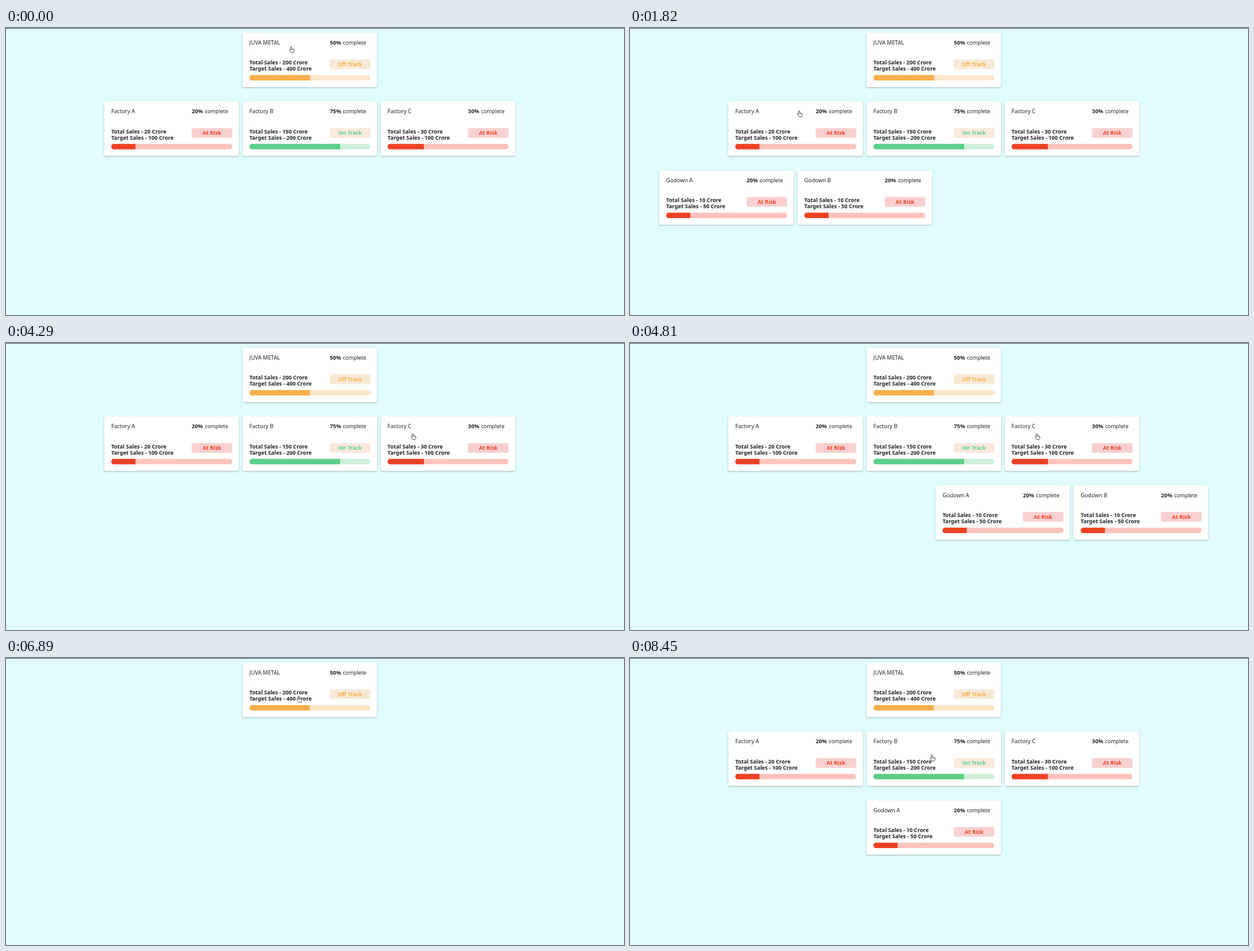
Write an HTML page with a canvas that moves like this. It is 999 px wide and 465 px high and loops after 8970 ms.

```html
<!DOCTYPE html>
<html lang="en">
<head>
<meta charset="utf-8">
<title>Sales overview</title>
<style>
  html, body { margin: 0; width: 100%; height: 100%; overflow: hidden; background: #e0fcfd; }
  canvas { display: block; }
</style>
</head>
<body>
<canvas id="stage" width="999" height="465"></canvas>
<script>
const ctx = document.getElementById('stage').getContext('2d');
const LOOP = 8970, TICK = 130;
const FONT = '"Noto Sans", "Open Sans", sans-serif';
const INK = '#212529';

const STATUS = {
  off:  { label: 'Off Track', main: '#f9b04b', track: '#fde5c9', badge: '#f8e9d6' },
  on:   { label: 'On Track',  main: '#5bce86', track: '#cdefd9', badge: '#fbe9dc' },
  risk: { label: 'At Risk',   main: '#ee4124', track: '#fbc3bc', badge: '#f9d0d0' }
};

const COLUMN = 223.35, ROW = 111.5;
const card = (name, col, row, sales, goal, status) => ({
  name, sales, goal, status: STATUS[status],
  x: 382.2 + col * COLUMN, y: 7.5 + row * ROW
});
const godown = (letter, col) => card('Godown ' + letter, col, 2, 10, 50, 'risk');

const company = card('JUVA METAL', 0, 0, 200, 400, 'off');
const factories = [
  card('Factory A', -1, 1, 20, 100, 'risk'),
  card('Factory B', 0, 1, 150, 200, 'on'),
  card('Factory C', 1, 1, 30, 100, 'risk')
];

// Cards visible only between two times
const opened = [
  { from: 1820, to: 3510, cards: [godown('A', -1.5), godown('B', -0.5)] },
  { from: 4810, to: 5720, cards: [godown('A', 0.5), godown('B', 1.5)] },
  { from: 8450, to: LOOP, cards: [godown('A', 0)] }
];

// Pointer moves: start time, number of ticks, destination
const START = [462, 35];
const moves = [
  [520, 4, [271, 134]],
  [1300, 2, [274.5, 139]],
  [2730, 3, [285.5, 144]],
  [3770, 5, [658.5, 151.5]],
  [6240, 3, [474, 67]],
  [7800, 3, [489, 162]]
];

const hand = new Path2D('M-2-4Q-2-5-1.1-5Q-.2-5-.2-4V-1.2L3-.7Q4.3-.4 4.3.8L4 2.6' +
  'Q3.7 3.6 3 4.8H-1.2Q-1.8 3.2-3.8 1.2Q-4.4.2-3.6-.1Q-3-.2-2 .8Z');
const knuckles = new Path2D('M-.2-1V1M1.4-.8V1M2.9-.6V1');

function pointerAt(t) {
  let pos = START;
  for (const [start, ticks, goal] of moves) {
    if (t < start) break;
    const p = Math.min(1, (Math.floor((t - start) / TICK) + 1) / ticks);
    const ease = p * p * (3 - 2 * p);
    pos = pos.map((v, i) => v + (goal[i] - v) * ease);
  }
  return pos;
}

function box(x, y, w, h, r, color) {
  ctx.fillStyle = color;
  ctx.beginPath();
  ctx.roundRect(x, y, w, h, r);
  ctx.fill();
}

function write(text, x, y, size, weight, color = INK, align = 'left') {
  ctx.font = `${weight} ${size}px ${FONT}`;
  ctx.textAlign = align;
  ctx.fillStyle = color;
  ctx.fillText(text, x, y);
}

function drawCard({ name, sales, goal, status, x, y }) {
  const share = sales / goal;
  ctx.save();
  ctx.shadowColor = 'rgba(0, 30, 30, .3)';
  ctx.shadowBlur = 2.5;
  ctx.shadowOffsetY = 1;
  box(x, y, 217.6, 88.3, 2.5, '#fff');
  ctx.restore();

  write(name, x + 11.3, y + 19.1, 8.9, 500);
  write(Math.round(share * 100) + '%', x + 141.3, y + 19.1, 8.9, 700);
  write('complete', x + 162.4, y + 19.1, 8.65, 400);
  write(`Total Sales - ${sales} Crore`, x + 11.3, y + 51.5, 8.73, 700);
  write(`Target Sales - ${goal} Crore`, x + 11.3, y + 61.5, 8.73, 700);

  box(x + 141.3, y + 43.3, 65.5, 15.7, 3, status.badge);
  write(status.label, x + 174, y + 54.2, 8.75, 700, status.main, 'center');

  box(x + 11.3, y + 68.8, 195.5, 8.6, 4.3, status.track);
  box(x + 11.3, y + 68.8, 195.5 * share, 8.6, [4.3, 0, 0, 4.3], status.main);
}

function drawPointer([x, y]) {
  ctx.save();
  ctx.translate(x, y);
  ctx.fillStyle = '#fff';
  ctx.strokeStyle = '#4c4f52';
  ctx.lineWidth = 0.9;
  ctx.fill(hand);
  ctx.stroke(hand);
  ctx.lineWidth = 0.5;
  ctx.stroke(knuckles);
  ctx.restore();
}

function draw(t) {
  ctx.fillStyle = '#e0fcfd';
  ctx.fillRect(0, 0, 999, 465);
  ctx.fillStyle = '#4b5c60';
  ctx.fillRect(0, 0, 999, 1);

  drawCard(company);
  if (t < 6890 || t >= 7540) factories.forEach(drawCard);
  for (const { from, to, cards } of opened) {
    if (t >= from && t < to) cards.forEach(drawCard);
  }
  drawPointer(pointerAt(t));
}

const begin = performance.now();
function frame() {
  draw((performance.now() - begin) % LOOP);
  requestAnimationFrame(frame);
}
frame();
</script>
</body>
</html>
```
